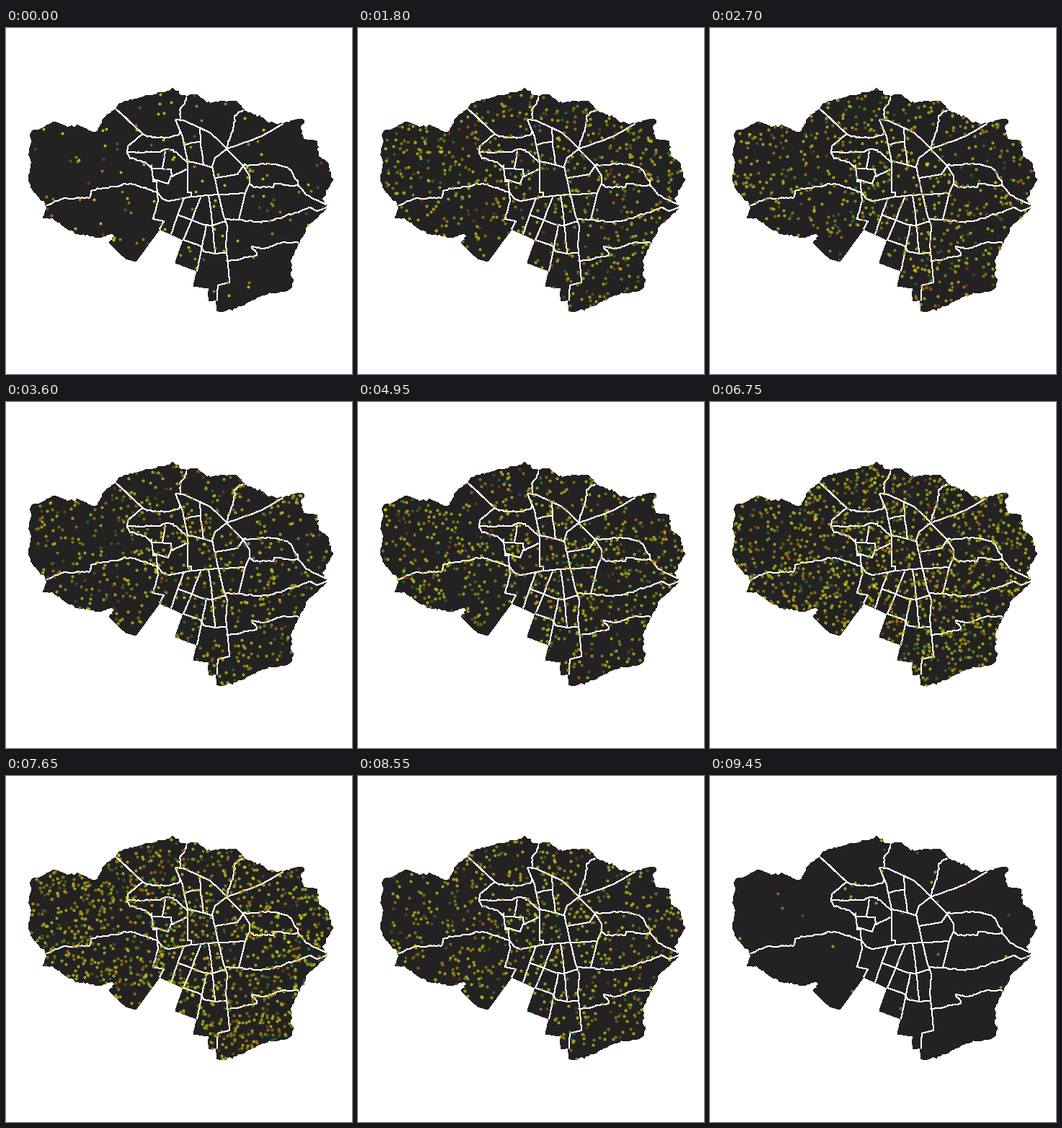
These frames come from a looping animation (480 by 480 pixels, 9.9 s). A matplotlib script:

```python
import numpy as np
import matplotlib.pyplot as plt
from matplotlib.animation import FuncAnimation
from matplotlib.collections import LineCollection
from matplotlib.colors import to_rgba_array
from matplotlib.patches import Polygon
from matplotlib.path import Path

SIZE, DPI, STEPS = 480, 100, 22
PX = 72 / DPI  # one pixel in points
LAND = "#222222"
PALETTE = ["#d6d61c", "#bf860c", "#8fa81f", "#3a7a2b", "#8a4210", "#2f6a60"]
SHARES = [0.42, 0.2, 0.15, 0.13, 0.07, 0.03]
# Dots per step, linear between a few known levels
COUNTS = np.interp(range(STEPS), [0, 1, 2, 3, 4, 8, 11, 15, 17, 19, 20, 21],
                   [122, 90, 80, 170, 620, 630, 720, 1150, 1180, 650, 270, 28])


def rough(points, amp, seed, step=3):
    """Subdivide a polyline and shake the new vertices."""
    rng = np.random.default_rng(seed)
    pts = np.array(points, float)
    out = []
    for a, b in zip(pts[:-1], pts[1:]):
        n = max(1, int(np.hypot(*(b - a)) / step))
        piece = a + (b - a) * (np.arange(n) / n)[:, None]
        piece[1:] += rng.normal(0, amp, (n - 1, 2))
        out.extend(piece)
    out.append(pts[-1])
    return np.array(out)


# Coast, clockwise from the north-west
north = [(33, 149), (36, 143), (46, 141), (67, 130), (84, 137), (102, 136),
         (120, 145), (127, 143), (136, 125), (153, 112), (157, 105),
         (185, 97), (227, 87), (231, 83), (240, 91), (250, 96), (258, 92),
         (266, 93), (278, 104), (319, 101), (331, 115), (357, 125),
         (365, 132), (375, 134), (411, 126)]
east = [(411, 126), (414, 130), (408, 139), (412, 155), (431, 157), (433, 178),
        (447, 186), (452, 213), (438, 238), (445, 245), (444, 251),
        (418, 275), (405, 300), (396, 320), (394, 342), (399, 350),
        (397, 358), (388, 365), (356, 370), (325, 386), (299, 394), (292, 392)]
south = [(292, 392), (292, 378), (281, 378), (281, 361), (260, 358),
         (265, 337), (235, 326), (246, 294), (213, 279), (180, 324),
         (166, 320), (143, 298)]
west = [(143, 298), (151, 289), (148, 285), (128, 290), (104, 287), (84, 278),
        (64, 263), (51, 263), (57, 250), (54, 242), (38, 226), (31, 208),
        (35, 188), (32, 168), (36, 158), (33, 149)]
coast = np.vstack([rough(north, 0.8, 1), rough(east, 0.9, 2),
                   rough(south, 0.1, 3), rough(west, 0.8, 4)])
inside = Path(coast).contains_points

# Winding district borders
rivers = [
    [(56, 246), (78, 237), (115, 236), (120, 225), (173, 216), (210, 228)],
    [(190, 147), (204, 152), (222, 152), (240, 148), (241, 142)],
    [(168, 173), (214, 172), (222, 168), (232, 169), (252, 186)],
    [(168, 173), (172, 181), (193, 186), (203, 195)],
    [(250, 96), (248, 105), (241, 113), (242, 126)],
    [(329, 114), (317, 122), (315, 140), (306, 168)],
    [(329, 191), (365, 188), (390, 193), (398, 202), (406, 219)],
    [(338, 216), (344, 221), (371, 221), (372, 216), (406, 219), (417, 232),
     (444, 245)],
    [(304, 265), (350, 269), (370, 267), (422, 249), (431, 254), (445, 248)],
    [(306, 323), (320, 322), (348, 315), (341, 303), (358, 306), (385, 297),
     (406, 298)],
]
# Straight borders, outer ring and inner blocks
roads = [
    [(153, 113), (190, 147), (169, 164), (168, 173)],
    [(235, 127), (245, 151), (252, 185), (275, 190), (287, 194)],
    [(235, 127), (246, 128), (283, 145), (306, 167)],
    [(269, 138), (270, 160), (274, 190)],
    [(249, 162), (258, 159), (269, 158)],
    [(306, 168), (355, 150), (384, 133)],
    [(306, 168), (290, 180), (286, 192), (301, 258), (307, 275), (305, 300),
     (310, 353), (294, 357), (293, 378)],
    [(307, 169), (329, 191), (321, 203), (290, 208)],
    [(329, 191), (338, 205), (338, 216), (332, 229), (323, 266)],
]
blocks = [
    [(221, 171), (217, 195)],
    [(202, 190), (204, 213), (209, 213), (210, 228), (217, 237), (225, 240),
     (257, 234), (296, 231), (330, 229)],
    [(203, 195), (229, 196), (230, 206), (250, 196)],
    [(204, 210), (225, 216), (229, 205)],
    [(252, 186), (252, 228), (257, 228), (257, 234)],
    [(210, 228), (211, 240), (204, 265), (219, 268), (213, 279)],
    [(247, 236), (238, 260), (229, 286)],
    [(270, 235), (257, 268), (246, 294)],
    [(238, 259), (275, 273), (286, 274), (305, 268)],
    [(281, 233), (285, 260), (290, 312)],
    [(278, 273), (265, 337)],
    [(246, 294), (271, 303), (274, 310), (290, 313), (305, 312)],
]
borders = [rough(p, 0.6, 20 + k) for k, p in enumerate(rivers)]
borders += [rough(p, 0.2, 50 + k, 6) for k, p in enumerate(roads + blocks)]


def scatter_dots(i):
    """Random spots on the land with a colour each."""
    rng = np.random.default_rng(700 + i)
    n = int(COUNTS[i])
    xy = rng.uniform((28, 82), (454, 397), (n * 4, 2)).round()
    xy = xy[inside(xy)][:n]
    return xy, rng.choice(PALETTE, len(xy), p=SHARES)


fig = plt.figure(figsize=(SIZE / DPI, SIZE / DPI), dpi=DPI, facecolor="white")
ax = fig.add_axes([0, 0, 1, 1])
ax.set(xlim=(0, SIZE), ylim=(SIZE, 0))
ax.axis("off")
ax.add_patch(Polygon(coast, fc=LAND, ec="none", antialiased=False))
ax.add_collection(LineCollection(borders, colors="white", linewidths=PX,
                                 antialiaseds=False))
dots = ax.scatter([], [], s=(3 * PX) ** 2, linewidths=PX, zorder=3)


def update(i):
    xy, colors = scatter_dots(i)
    rgba = to_rgba_array(list(colors))
    dots.set_offsets(xy + 0.5)
    rgba[:, 3] = 0.45
    dots.set_facecolor(rgba)
    rgba[:, 3] = 0.8
    dots.set_edgecolor(rgba)
    return (dots,)


anim = FuncAnimation(fig, update, frames=STEPS, interval=1000 * 9.9 / STEPS,
                     repeat=True, repeat_delay=0)
plt.show()
```
